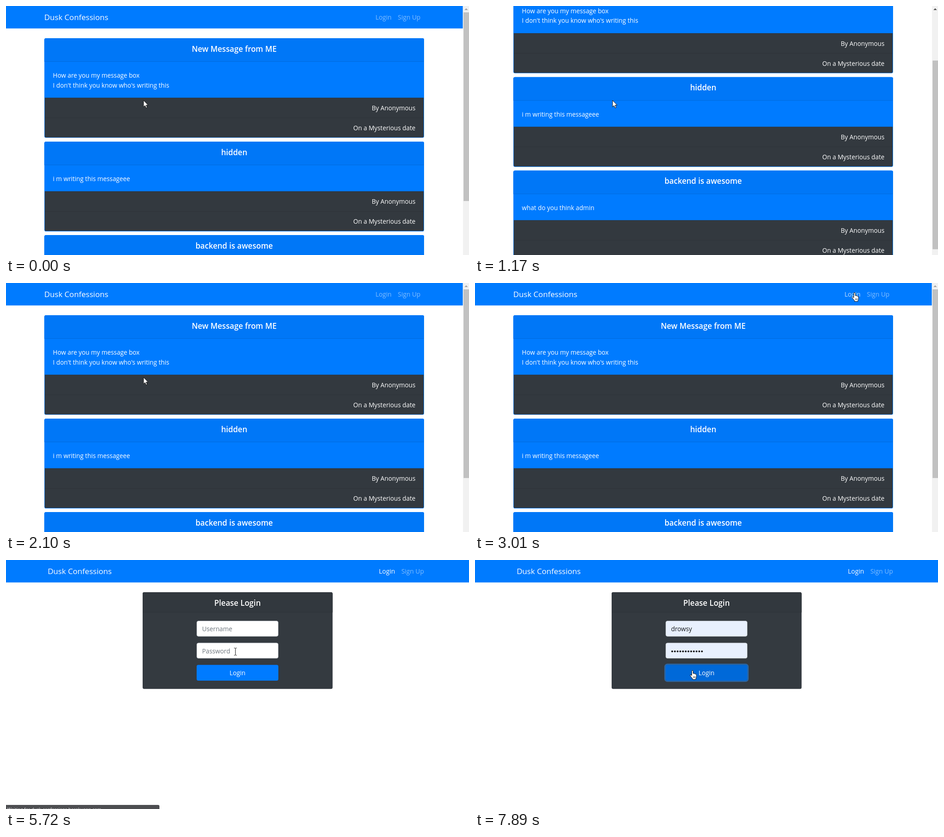
Animation of 1020x549 px, one loop 8000 ms. Source, as an HTML page:

```html
<!DOCTYPE html>
<html lang="en">
<head>
<meta charset="utf-8">
<title>Message board</title>
<style>
html, body { margin: 0; width: 100%; height: 100%; overflow: hidden; background: #fff; }
svg { display: block; width: 1020px; height: 549px; }
text { font-family: "Open Sans", "Noto Sans", sans-serif; fill: #fff; font-size: 13.75px; white-space: pre; }
.title { font-size: 17.1px; font-weight: 600; text-anchor: middle; }
.brand { font-size: 17.1px; }
.link { font-size: 14px; }
.small { font-size: 11px; }
.status { font-size: 9.85px; fill: #e8eaed; }
.end { text-anchor: end; }
.hint { fill: #6c757d; }
.preview { font: 12px "Liberation Sans", Arial, sans-serif; fill: #111; }
.filled { fill: #16191c; }
</style>
</head>
<body>
<svg id="stage" viewBox="0 0 1020 549"></svg>
<script>
const LOOP = 8000;
const BRAND = 'Dusk Confessions', USER = 'drowsy', HOST = 'dusk-confessions.herokuapp.com';

// --- markup helpers ---
const rect = (x, y, w, h, fill, extra = '') =>
  `<rect x="${x}" y="${y}" width="${w}" height="${h}" fill="${fill}" ${extra}/>`;
const text = (x, y, value, cls = '', extra = '') =>
  `<text x="${x}" y="${y}" class="${cls}" ${extra}>${value}</text>`;
const rule = (x, y, w) => rect(x, y, w, 0.9, '#000', 'opacity=".125"');
const dots = (x, y, step, r, fill) => Array.from({ length: 12 }, (_, i) =>
  `<circle cx="${x + i * step}" cy="${y}" r="${r}" fill="${fill}"/>`).join('');
const field = (id, y) =>
  rect(420.4, y, 179.2, 33.6, '#fff', `id="${id}" rx="3.6" stroke="#ced4da" stroke-width=".9"`);

const navbar = (width, x, id) =>
  rect(0, 0, width, 49.5, '#007bff') +
  text(x, 31, BRAND, 'brand') +
  text(x + 729.6, 30, 'Login', 'link', `id="${id}"`) +
  text(x + 779, 30, 'Sign Up', 'link', 'fill-opacity=".5"');

function card(y, title, lines) {
  const body = y + 52, foot = body + 36 + 21.6 * lines.length, height = foot + 88.4 - y;
  return rect(84.5, y, 836.5, height, '#007bff', 'rx="3.6"') +
    `<path d="M84.5 ${body}V${y + 3.6}q0-3.6 3.6-3.6H917.4q3.6 0 3.6 3.6V${body}Z" fill="#0077f7"/>` +
    rule(85.4, body - 0.9, 834.7) +
    `<path d="M85.4 ${foot}H920.1V${foot + 84.8}q0 2.7-2.7 2.7H88.1q-2.7 0-2.7-2.7Z" fill="#33393f"/>` +
    rule(85.4, foot, 834.7) + rule(85.4, foot + 44, 834.7) +
    text(502.7, y + 29.5, title, 'title') +
    lines.map((line, i) => text(103.3, body + 35 + 21.6 * i, line)).join('') +
    text(902, foot + 27.8, 'By Anonymous', 'end') +
    text(902, foot + 71.8, 'On a Mysterious date', 'end');
}

const board = `<g id="board">
  <g id="content">${navbar(1006.5, 84.3, 'boardLogin')}
    ${card(71, 'New Message from ME', ['How are you my message box', "I don't think you know who's writing this"])}
    ${card(299, 'hidden', ['i m writing this messageee'])}
    ${card(505, 'backend is awesome', ['what do you think admin'])}
  </g>
  ${rect(1006.7, 0, 14, 549, '#f1f1f1')}
  <path id="arrowUp" d="M1010 9l3.8-4 3.8 4Z"/>
  ${rect(1008, 14, 12, 416, '#c1c1c1', 'id="thumb"')}
</g>`;

const login = `<g id="login">${navbar(1020, 91.9, 'formLogin')}
  ${rect(301, 71, 418.5, 213.3, '#343a40', 'rx="3.6"')}
  <path d="M301 115.5V74.6q0-3.6 3.6-3.6H715.9q3.6 0 3.6 3.6V115.5Z" fill="#32383e"/>
  ${rule(301, 114.8, 418.5)}
  ${text(510, 100.5, 'Please Login', 'title')}
  ${rect(418.4, 132.6, 183.2, 37.4, 'none', 'id="fieldRing" rx="5.4" stroke="#007bff" stroke-opacity=".4" stroke-width="3.2"')}
  ${field('userField', 134.6)}${field('passField', 183)}
  <g id="hintUser">${text(432, 157, 'Username', 'hint')}</g>
  <g id="hintPass">${text(432, 205.5, 'Password', 'hint')}</g>
  <g id="preview">${text(432, 157.3, USER, 'preview')}</g>
  <g id="filled">${text(432, 157.3, USER, 'filled')}${dots(434.4, 201.5, 5.96, 2, '#111')}</g>
  ${rect(418.6, 229.9, 182.8, 37.4, 'none', 'id="buttonRing" rx="5.4" stroke="#268fff" stroke-opacity=".5" stroke-width="3"')}
  ${rect(420, 231.3, 180, 34.6, '#007bff', 'id="button" rx="3.6"')}
  ${text(510, 253.6, 'Login', '', 'text-anchor="middle"')}
  <g id="dropdown">
    ${rect(432, 142, 1, 19, '#000')}
    ${rect(420, 169.5, 180, 101.5, '#292a2d')}
    ${rect(420, 176.5, 180, 52, '#4b4c4e', 'id="row"')}
    <g fill="#707275"><circle cx="436.2" cy="202.5" r="5.6"/>
      <path d="M433 199l3-1 1 2-2 2 2 3-1 2-3-4ZM438 202l3-1-1 4-2 1Z" fill="#414245"/></g>
    ${text(452.3, 197, USER, 'small')}
    ${dots(454.4, 212.5, 4.8, 1.65, '#e8eaed')}
    ${rect(420, 236, 180, 0.9, '#4a4c50')}
    ${text(429.3, 258.4, 'Manage passwords...', 'small')}
  </g>
</g>`;

const status = `<g id="status">
  <path id="bubble" fill="#2d2e31"/>${text(3, 552.6, '', 'status', 'id="statusText"')}
</g>`;

const pointers = `<g id="pointer" stroke-linejoin="round">
  <path id="arrow" d="M0 0V14.6L3.3 11.5 5.7 16.8 8 15.8 5.7 10.7H10.2Z" fill="#fff" stroke="#111"/>
  <g id="hand" transform="translate(-5.5 0)"><path fill="#fff" stroke="#111"
    d="M4 11V2.4Q4 .5 5.5 .5T7 2.4V7.5Q7.2 6.6 8.4 6.8T9.7 8.2Q10 7.3 11 7.6T12.2 9.2Q12.6 8.4 13.5 8.8T14.4 10.5V14Q14.4 16 13 18.2V20.2H5.6V18.4Q3.5 16 .9 12.4Q0 10.6 1.2 10T4 12Z"/>
    <path d="M7.6 13.5v3.5M9.6 13.5v3.5M11.6 13.5v3.5" stroke="#111" stroke-width=".8"/></g>
  <path id="ibeam" d="M-3-8H-1L0-7 1-8H3M0-7V7M-3 8H-1L0 7 1 8H3" fill="none" stroke="#111"/>
</g>`;

document.getElementById('stage').innerHTML = board + login + status + pointers;

const el = Object.fromEntries([...document.querySelectorAll('[id]')].map(node => [node.id, node]));
const set = (id, name, value) => el[id].setAttribute(name, value);
const show = (id, visible) => set(id, 'display', visible ? 'inline' : 'none');

// --- timing ---
const ramp = (t, from, to) => Math.min(1, Math.max(0, (t - from) / (to - from)));
const smooth = p => p * p * (3 - 2 * p);
const easeOut = p => 1 - (1 - p) ** 2;
const mix = (a, b, p) => a + (b - a) * p;

const SCROLL = [[0, 0], [880, 6], [1030, 58], [1170, 142.3], [1300, 151], [1610, 150.8],
  [1720, 150.6], [1830, 150.2], [1960, 98], [2100, 0]];
const MOVES = [
  { from: 2530, to: 3010, x: 836, y: 20.5, ease: smooth },
  { from: 4480, to: 4810, x: 588, y: 143, ease: p => p ** 1.4 },
  { from: 4810, to: 5130, x: 508, y: 205, ease: easeOut },
  { from: 5690, to: 5890, x: 468, y: 159.5, ease: smooth },
  { from: 6450, to: 6690, x: 471, y: 204, ease: smooth },
  { from: 7120, to: 7430, x: 479, y: 243, ease: smooth },
];

const scrollAt = t => SCROLL.filter(([start]) => start <= t).pop()[1];

function pointerAt(t) {
  let x = 303, y = 208;
  for (const move of MOVES) {
    const p = move.ease(ramp(t, move.from, move.to));
    x = mix(x, move.x, p);
    y = mix(y, move.y, p);
  }
  return { x, y };
}

function drawStatus(t) {
  const wide = t >= 3820;
  const width = wide ? 338 : 230;
  set('status', 'opacity', ramp(t, 3140, 3260) * (1 - ramp(t, 5690, 5890)));
  set('bubble', 'd', `M0 549V540H${width - 3}q3 0 3 3V549Z`);
  const label = t >= 4500 ? `Waiting for ${HOST}...`
    : `https://${HOST}/` + (wide ? 'accounts/login/?next=/discuss' : 'acco…');
  if (el.statusText.textContent !== label) el.statusText.textContent = label;
}

function draw(t) {
  const { x, y } = pointerAt(t);
  const inside = (left, top, right, bottom) => x > left && x < right && y > top && y < bottom;
  const onForm = t >= 5380;
  const open = t >= 6140 && t < 7090;
  const done = t >= 7090;

  show('board', !onForm);
  show('login', onForm);

  const scroll = scrollAt(t);
  set('content', 'transform', `translate(0 ${-scroll})`);
  set('thumb', 'y', 14 + scroll * 0.747);
  set('arrowUp', 'fill', scroll ? '#505050' : '#a3a3a3');

  const overLink = !onForm && inside(806, 7, 856, 42);
  set('boardLogin', 'fill-opacity', overLink || t >= 4400 ? 0.75 : 0.5);

  const overRow = open && inside(420, 176, 600, 229);
  const tinted = overRow || done;
  show('dropdown', open);
  set('dropdown', 'opacity', ramp(t, 6110, 6240));
  show('row', overRow);
  show('preview', overRow);
  show('filled', done);
  show('hintUser', !tinted);
  show('hintPass', !tinted);
  for (const id of ['userField', 'passField']) set(id, 'fill', tinted ? '#e8f0fe' : '#fff');

  const focus = ramp(t, 6110, 6240) * (1 - ramp(t, 7590, 7760));
  set('fieldRing', 'opacity', focus);
  set('userField', 'stroke', focus > 0.5 ? '#80bdff' : '#ced4da');

  const overButton = done && inside(420, 231, 600, 266);
  set('button', 'fill', t >= 7610 && t < 7880 ? '#0062cc' : overButton ? '#0069d9' : '#007bff');
  set('buttonRing', 'opacity', ramp(t, 7590, 7760));

  const overField = onForm && (inside(420, 134, 600, 169) || !open && inside(420, 182, 600, 217));
  const hand = overLink || overButton;
  show('hand', hand);
  show('ibeam', overField);
  show('arrow', !hand && !overField);
  set('pointer', 'transform', `translate(${x.toFixed(2)} ${y.toFixed(2)})`);

  drawStatus(t);
}

const start = performance.now();
function tick() {
  draw((performance.now() - start) % LOOP);
  requestAnimationFrame(tick);
}
tick();
</script>
</body>
</html>
```
